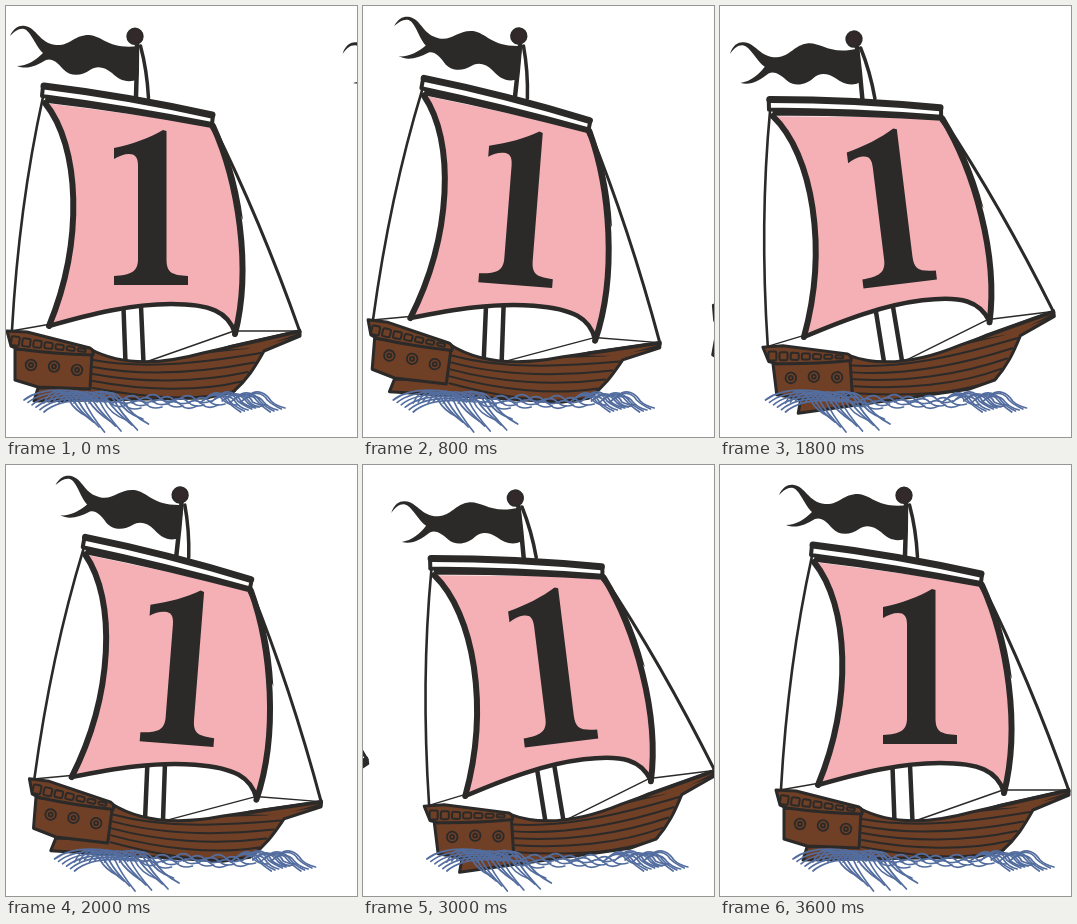
These frames come from a looping animation (351x431 px, 3800 ms). An HTML page:

```html
<!DOCTYPE html>
<html lang="en">
<head>
<meta charset="utf-8">
<title>Sailing ship</title>
<style>
  html, body { margin: 0; width: 100%; height: 100%; overflow: hidden; background: #fff; }
  svg { display: block; width: 100%; height: 100%; overflow: hidden; }
  .ink { fill: #2b2a29; }
  .line { fill: none; stroke: #2b2a29; stroke-linecap: round; stroke-linejoin: round; }
  .wood { fill: #6f3f26; stroke: #2b2a29; stroke-width: 3; stroke-linejoin: round; }
  #waves { fill: none; stroke: #536d9f; stroke-width: 1.7; stroke-linecap: round; }
</style>
</head>
<body>
<svg viewBox="0 0 351 431">
  <defs>
    <g id="ship">
      <!-- mast -->
      <path class="line" stroke-width="4.500" d="M131 38Q131 66 130 91M117.500 302L119.500 357M135 300L137.500 357"/>
      <path class="line" stroke-width="3.500" d="M134.500 40Q141 64 142.500 92"/>
      <!-- flag -->
      <path class="ink" d="M4 30C8 21 14 19 19 20C31 22 33 37 50 39C64 40 68 29 83 29C97 30 103 44 133 40L132 73C122 78 113 74 106 67C99 61 91 59 84 64C76 70 64 71 57 63C51 56 46 52 40 54C30 60 21 64 11 60C21 60 30 54 37 47C30 41 25 25 18 23C13 22 9 25 4 30Z"/>
      <circle cx="129" cy="30.300" r="7.700" fill="#33292a" stroke="#2b2a29" stroke-width="2"/>
      <!-- ropes -->
      <path class="line" stroke-width="2.600" d="M37 91Q13 200 6 324"/>
      <path class="line" stroke-width="3" d="M207 119Q254 213 294 326"/>
      <path class="line" stroke-width="1.400" d="M5 325L45 318M137 357L228 325L293 325"/>
      <!-- sail -->
      <path d="M39 97C74 140 78 235 43 320C85 308 125 298 165 298C205 298 222 306 229 328C246 262 232 175 207 120Q120 107 39 97Z" fill="#f4b0b5"/>
      <path class="line" stroke-width="6" d="M39 97C74 140 78 235 43 320M207 120C232 175 246 262 229 328"/>
      <path class="line" stroke-width="4.500" d="M43 320C85 308 125 298 165 298C205 298 222 306 229 327"/>
      <path class="line" stroke-width="6" d="M42 94Q120 103 206 119"/>
      <path class="ink" d="M207 118Q229 155 237 214L230 200Q222 148 204 122Z"/>
      <path d="M37 80Q120 91 207 109L206 118Q120 101 36 90Z" fill="#fff" stroke="#2b2a29" stroke-width="4" stroke-linejoin="round"/>
      <path class="line" stroke-width="7" d="M38 80Q120 90 206 109"/>
      <!-- numeral -->
      <path class="ink" d="M108 279V270C125 269 132 266 132 253V160C132 151 129 148 123 148C118 148 113 150 108 153V142C127 138 143 132 157 124L160.500 125V253C160.500 267 166 269 182 270V279Z"/>
      <!-- hull -->
      <path class="wood" d="M84 343C112 358 150 360 197 347L294 325L294 330L258 345C249 361 241 374 227 386L200 392L28 395L32 382L84 380Z"/>
      <g id="planks" class="line" stroke-width="2"></g>
      <path class="ink" d="M195 348L224 339L295 323V330L240 343Z"/>
      <path d="M222 343.500L292 327.500L254 341.500Z" fill="#6f3f26"/>
      <path class="wood" d="M9 343L86 347L84 383L32 381L9 374Z"/>
      <path class="wood" d="M1 325L21 326L84 342Q88 344 87 349Q48 348 12 343L5 340Z"/>
      <g id="trim" class="line"></g>
    </g>
    <g id="waves"></g>
  </defs>
  <g id="stage"></g>
</svg>
<script>
  const CELL = 351, STEP_MS = 200, STEPS = 19, DRIFT = 55 / 18;
  const ROCK = [0, -7, -11, -7, 4.5, 10];   // degrees, one per step
  const PIVOT = '140 215.5';
  const $ = id => document.getElementById(id);

  function add(parent, tag, attrs) {
    const el = document.createElementNS('http://www.w3.org/2000/svg', tag);
    for (const key in attrs) el.setAttribute(key, attrs[key]);
    return parent.appendChild(el);
  }
  const curve = (parent, d) => add(parent, 'path', { d });

  function buildHull() {
    for (let i = 0; i < 5; i++) {
      const left = 354 + 7 * i, right = 347 + 9.5 * i;
      curve($('planks'), `M87 ${left}C135 ${left + 9} 190 ${right + 11} ${255 - 6.5 * i} ${right}`);
    }
    for (let i = 0; i < 7; i++) {
      add($('trim'), 'rect', {
        x: 6 + 11 * i, y: 330 + 2 * i, width: 8, height: 9 - i,
        rx: 1.5, 'stroke-width': 2, transform: `rotate(8 ${6 + 11 * i} ${330 + 2 * i})`
      });
    }
    for (const [cx, cy] of [[25, 359], [48, 360.5], [71, 364]]) {
      add($('trim'), 'circle', { cx, cy, r: 5.3, 'stroke-width': 1.8 });
      add($('trim'), 'circle', { cx, cy, r: 2, 'stroke-width': 1.8 });
    }
  }

  function buildWaves() {
    const w = $('waves');
    for (let i = 0; i < 6; i++) {           // flat strands at the stern
      curve(w, `M${18 + 4 * i} ${394 + 2.4 * i}Q${36 + 4 * i} ${380 + 2 * i} ${76 + 5 * i} ${386 + 2 * i}`);
    }
    for (let i = 0; i < 12; i++) {          // fan of spray below the hull
      const x = 38 + 5 * i, endX = Math.min(x + 52, 70 + 5.5 * i);
      curve(w, `M${x} ${397 - i % 3}C${x + 8} ${380 + i % 3} ${x + 18} ${383 + i % 4} ${x + 25} ${394 + i % 3}` +
        `Q${x + 31} ${405 + i % 4} ${endX + 12} ${411 + i * 5 % 16}`);
    }
    for (let i = 0; i < 16; i++) {          // low ripples amidships
      const x = 84 + 7 * i, y = 391 + i * 5 % 8;
      curve(w, `M${x} ${y}q8 -5 14 1t16 ${3 - i % 3}`);
    }
    for (let i = 0; i < 14; i++) {          // tuft at the bow
      const x = 194 + 3.7 * i, y = 397 - i * 3 % 8;
      curve(w, `M${x} ${y}C${x + 9} ${y - 8} ${x + 18} ${386 + i % 4} ${x + 23} ${394 + i % 3}` +
        `Q${x + 28} ${399 + i % 4} ${Math.min(x + 37, 279)} ${399 + i * 7 % 8}`);
    }
  }

  buildHull();
  buildWaves();

  // Neighbouring steps sit one cell away, so their overhang shows at the edges.
  const cells = [-1, 0, 1].map(offset => {
    const group = add($('stage'), 'g', {});
    const ship = add(group, 'use', { href: '#ship' });
    add(group, 'use', { href: '#waves' });
    return { offset, group, ship };
  });

  let shown = -1;
  function show(step) {
    if (step === shown) return;
    shown = step;
    for (const { offset, group, ship } of cells) {
      const k = step + offset;
      const exists = k >= 0 && k < STEPS;
      group.setAttribute('display', exists ? 'inline' : 'none');
      if (!exists) continue;
      group.setAttribute('transform', `translate(${offset * CELL + k * DRIFT} 0)`);
      ship.setAttribute('transform', `rotate(${ROCK[k % ROCK.length]} ${PIVOT})`);
    }
  }

  const start = performance.now();
  function tick() {
    show(Math.floor((performance.now() - start) / STEP_MS) % STEPS);
    requestAnimationFrame(tick);
  }
  tick();
</script>
</body>
</html>
```
